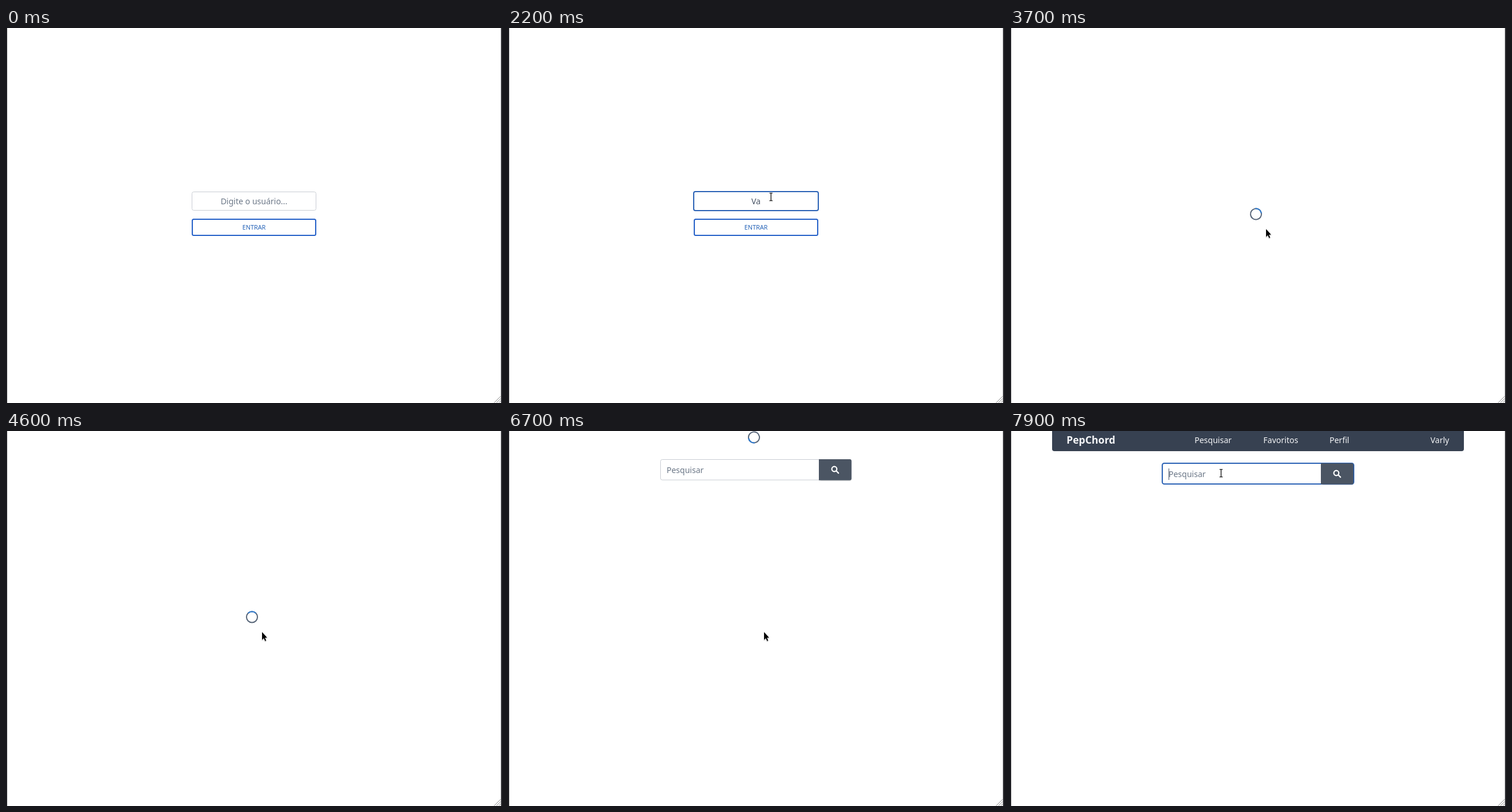
Write an HTML page that moves like this. It is 860 by 651 pixels and loops after 8000 ms.

```html
<!DOCTYPE html>
<html lang="pt">
<head>
<meta charset="utf-8">
<title>Login</title>
<style>
  html, body { margin: 0; width: 100%; height: 100%; overflow: hidden; background: #fff; }
  svg { display: block; width: 860px; height: 651px; font: 14px "Noto Sans", "Open Sans", sans-serif; }
  .hint { fill: #6b7787; }
  .field { fill: #fff; stroke: #c9cdd3; }
  .focus { fill: #fff; stroke: #2b62b5; stroke-width: 2; }
  .caret { fill: #4a5568; }
  .nav text { fill: #f5f6f8; }
  .ink { fill: #000; stroke: #fff; stroke-width: 1; paint-order: stroke; stroke-linejoin: round; }
  #cursor { filter: drop-shadow(.6px 1px .6px rgba(0, 0, 0, .3)); }
</style>
</head>
<body>
<svg viewBox="0 0 860 651">
  <rect width="860" height="651" fill="#fff"/>

  <g id="login">
    <rect id="userPlain" class="field" x="322.5" y="284.5" width="215" height="32" rx="3"/>
    <rect id="userFocus" class="focus" x="322" y="284" width="216" height="33" rx="3"/>
    <text id="user" x="430" y="306" text-anchor="middle"></text>
    <rect id="userCaret" class="caret" y="293" width="1" height="17"/>
    <rect id="enter" x="323" y="332" width="214" height="28" rx="2.5" stroke="#2460c8" stroke-width="2"/>
    <text x="430" y="350" text-anchor="middle" font-size="10.8" font-weight="500" fill="#2563b8">ENTRAR</text>
  </g>

  <g id="nav" class="nav">
    <path d="M73 0H787V31a4 4 0 0 1-4 4H77a4 4 0 0 1-4-4Z" fill="#374151"/>
    <text x="98" y="22" font-size="17.5" font-weight="700">PepChord</text>
    <text x="320" y="21">Pesquisar</text>
    <text x="439.3" y="21">Favoritos</text>
    <text x="554" y="21">Perfil</text>
    <text x="761.5" y="21" text-anchor="end">Varly</text>
  </g>

  <g id="search">
    <rect x="540" y="51" width="56" height="36" rx="4" fill="#000" opacity=".13"/>
    <rect id="searchPlain" class="field" x="264.5" y="49.5" width="331" height="35.5" rx="3"/>
    <rect id="searchFocus" class="focus" x="264" y="49" width="332" height="36" rx="3.5"/>
    <path d="M539 49H592.5a3 3 0 0 1 3 3V82.5a3 3 0 0 1-3 3H539Z" fill="#4b5563"/>
    <g fill="none" stroke="#fff" stroke-width="2.2" stroke-linecap="round">
      <circle cx="565.8" cy="66" r="4.3"/>
      <path d="M569.2 69.3L573 73.1"/>
    </g>
    <text class="hint" x="275" y="73">Pesquisar</text>
    <rect id="searchCaret" class="caret" x="275" y="58" width="1" height="20"/>
  </g>

  <g id="loader" fill="none" stroke-width="2">
    <circle r="9.5" stroke="#566477"/>
    <path d="M-6.72 -6.72A9.5 9.5 0 0 1 6.72 -6.72" stroke="#2f7bd0"/>
  </g>

  <path d="M0 0H2V651H0ZM858.3 0H860V651H858.3Z" fill="#202025"/>
  <path d="M846.5 650.5L857.5 639.5M850.5 650.5L857.5 643.5M854.5 650.5L857.5 647.5" stroke="#888" stroke-width="1"/>

  <g id="cursor">
    <path id="arrow" class="ink" d="M0 0V13.5L3 10.8L5.2 15.6L7.2 14.7L5 10L8.6 9.4Z"/>
    <path id="beam" class="ink" d="M-2.5 -7H-.5L0 -6.5L.5 -7H2.5V-6H.6V6H2.5V7H.5L0 6.5L-.5 7H-2.5V6H-.6V-6H-2.5Z"/>
    <path id="hand" class="ink" d="M-1 0.2C-.5 -.5 .6 -.3 1 .6L2.5 4L4 3.7L5.2 4.4L6.5 4.5L7 8L5.8 12H.2L-2.6 8.4C-3 7.4 -2 6.9 -1.2 7.5L.3 8.2L-1.2 2Z"/>
  </g>
</svg>
<script>
const LOOP = 8000, STEP = 100;
const FOCUS = 1200, LOADING = 3600, SEARCH = 5100, READY = 6800, SEARCH_FOCUS = 7700;
const NAME = "Varly", KEYS = [1800, 2000, 2300, 2500, 2700];

// time, x, y of the pointer
const TRACK = [
  [200, 122, 340], [300, 215, 352], [400, 330, 346], [500, 430, 338],
  [600, 480, 310], [700, 468, 274], [800, 457, 290], [900, 456, 292],
  [1000, 456, 293], [3200, 456, 293], [3300, 452, 320], [3400, 450, 339],
  [3600, 447, 345], [3700, 444, 349], [7000, 444, 349], [7100, 430, 300],
  [7200, 405, 200], [7300, 380, 110], [7400, 367, 78], [7500, 366, 73], [LOOP, 366, 73]
];

const el = id => document.getElementById(id);
const show = (id, on) => { el(id).style.display = on ? "" : "none"; };
const within = (p, x1, y1, x2, y2) => p.x >= x1 && p.x <= x2 && p.y >= y1 && p.y <= y2;

function pointerAt(t) {
  const i = Math.max(1, TRACK.findIndex(k => k[0] >= t));
  const [t0, x0, y0] = TRACK[i - 1], [t1, x1, y1] = TRACK[i];
  const f = Math.max(0, (t - t0) / (t1 - t0));
  return { x: x0 + (x1 - x0) * f, y: y0 + (y1 - y0) * f };
}

function drawLogin(t, hover) {
  const typed = NAME.slice(0, KEYS.filter(k => k <= t).length);
  const user = el("user");
  user.textContent = typed || "Digite o usuário...";
  user.setAttribute("fill", typed ? "#465264" : "#6b7787");
  show("userPlain", t < FOCUS);
  show("userFocus", t >= FOCUS);
  show("userCaret", (t >= FOCUS && t < 1700) || (t >= 2900 && t < 3100));
  el("userCaret").setAttribute("x", typed ? 447 : 430);
  el("enter").setAttribute("fill", hover ? "#f1f5fb" : "#fff");
}

function draw(t) {
  const login = t < LOADING, ready = t >= READY;
  const p = pointerAt(t);
  const onButton = login && t >= 200 && within(p, 322, 331, 538, 361);
  const onField = (login && within(p, 322, 284, 538, 317)) ||
                  (ready && within(p, 264, 56, 539, 92));

  show("login", login);
  if (login) drawLogin(t, onButton);

  show("nav", ready);
  show("search", t >= SEARCH);
  el("search").setAttribute("transform", `translate(0 ${ready ? 7 : 0})`);
  show("searchPlain", t < SEARCH_FOCUS);
  show("searchFocus", t >= SEARCH_FOCUS);
  show("searchCaret", t >= SEARCH_FOCUS);

  const second = t >= SEARCH;
  const angle = (t - (second ? SEARCH : LOADING)) * 0.36;
  show("loader", !login && !ready);
  el("loader").setAttribute("transform", `translate(426.5 ${second ? 11 : 323}) rotate(${angle})`);

  show("cursor", t >= 200);
  show("arrow", !onButton && !onField);
  show("beam", onField);
  show("hand", onButton);
  el("cursor").setAttribute("transform", `translate(${p.x} ${p.y})`);
}

const start = performance.now();
function tick() {
  const t = (performance.now() - start) % LOOP;
  draw(Math.floor(t / STEP) * STEP);
  requestAnimationFrame(tick);
}
tick();
</script>
</body>
</html>
```
